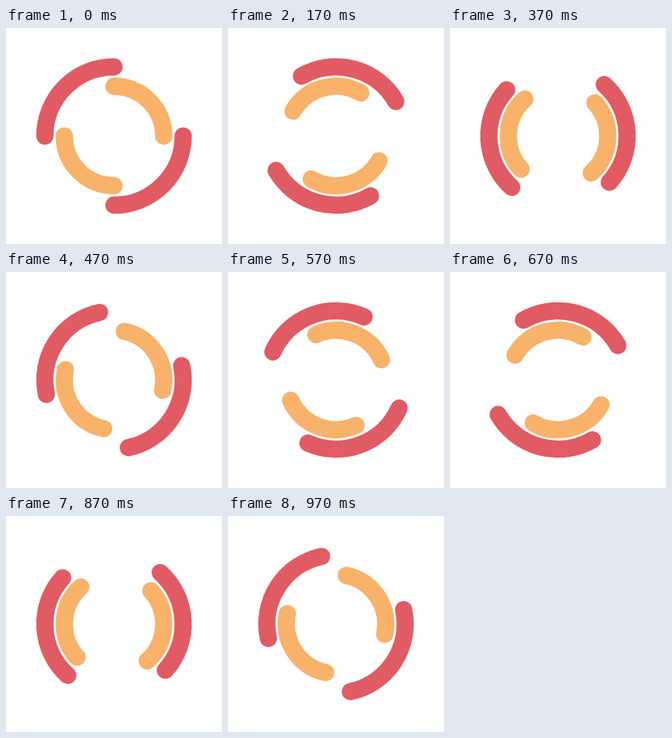
These frames come from a looping animation (270 px wide and 270 px high, 1000 ms). An HTML page with a canvas:

```html
<!DOCTYPE html>
<html lang="en">
<head>
<meta charset="utf-8">
<title>Double ring spinner</title>
<style>
html, body { margin: 0; width: 100%; height: 100%; overflow: hidden; background: #fff; }
canvas { display: block; width: 100vw; height: 100vh; }
</style>
</head>
<body>
<canvas id="stage"></canvas>
<script>
const SIZE = 270, LOOP = 1000, STEPS = 30;
const canvas = document.getElementById('stage');
const ctx = canvas.getContext('2d');

function resize() {
  const dpr = window.devicePixelRatio || 1;
  canvas.width = Math.round(innerWidth * dpr);
  canvas.height = Math.round(innerHeight * dpr);
}

// Two opposite quarter arcs with round caps
function ring(radius, color, angle) {
  ctx.strokeStyle = color;
  for (const a of [angle, angle + Math.PI]) {
    ctx.beginPath();
    ctx.arc(0, 0, radius, a, a + Math.PI / 2);
    ctx.stroke();
  }
}

function draw(ms) {
  // 30 steps per turn, each starting on the nearest 10 ms
  const step = Math.floor((ms % LOOP + 3.34) * STEPS / LOOP) % STEPS;
  const turn = step / STEPS * 2 * Math.PI;
  const scale = Math.min(canvas.width, canvas.height) / SIZE;

  ctx.setTransform(1, 0, 0, 1, 0, 0);
  ctx.fillStyle = '#fff';
  ctx.fillRect(0, 0, canvas.width, canvas.height);
  ctx.setTransform(scale, 0, 0, scale, canvas.width / 2, canvas.height / 2);
  ctx.lineWidth = 21.6;
  ctx.lineCap = 'round';
  ring(86.4, '#e15b64', turn);
  ring(62.1, '#f8b26a', Math.PI / 2 - turn);
}

const start = performance.now();
function tick() {
  draw(performance.now() - start);
  requestAnimationFrame(tick);
}

addEventListener('resize', resize);
resize();
tick();
</script>
</body>
</html>
```
